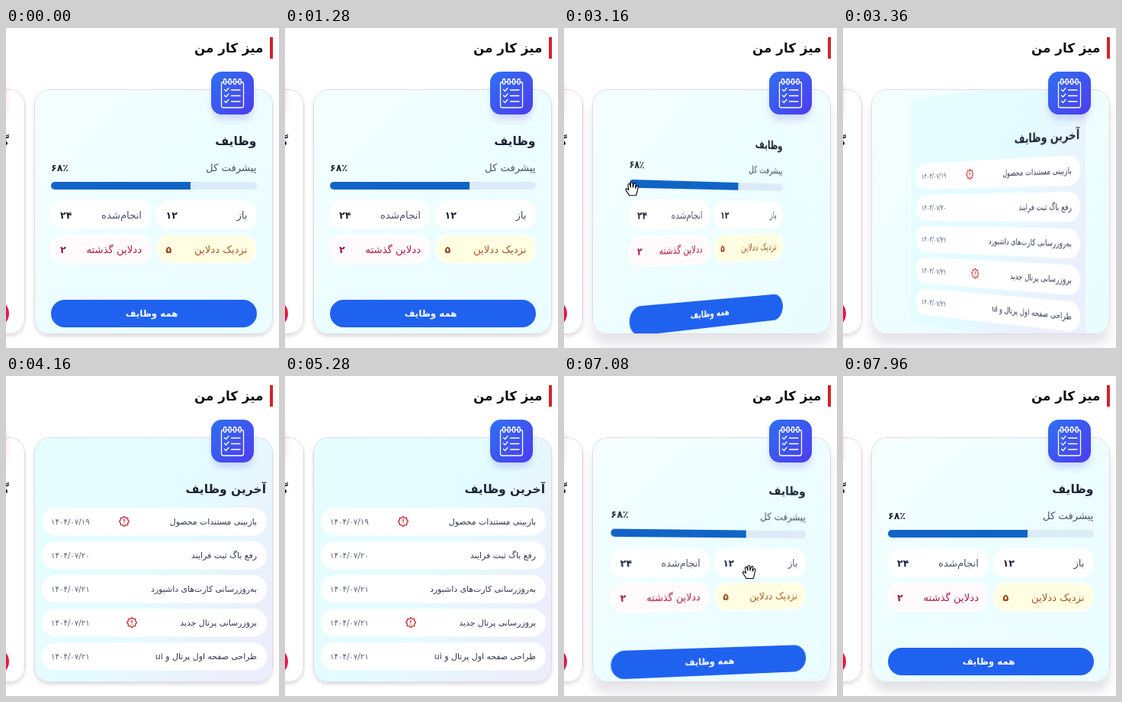
Write an HTML page that moves like this. It is 358 px wide and 418 px high and loops after 8 s.

```html
<!DOCTYPE html>
<html lang="fa">
<head>
<meta charset="utf-8">
<title>میز کار</title>
<style>
  html, body { margin: 0; width: 100%; height: 100%; overflow: hidden; background: #fff; }
  #stage { position: relative; width: 358px; height: 418px; overflow: hidden; background: #fff; }
  #stage > svg { position: absolute; left: 0; top: 0; }
  .card { position: absolute; top: 80px; width: 313px; height: 320px; border-radius: 20px; overflow: hidden; }
  .card::after { content: ""; position: absolute; inset: 0; border: 1px solid #e4d9e2; border-radius: 20px; }
  #side { left: -288px; background: #fff; box-shadow: 0 3px 4px rgba(70, 60, 100, .16); }
  #side::after { border-color: #f0ccd8; }
  #main { left: 37px; background: linear-gradient(135deg, #f5feff, #e8fdff); }
  .face { position: absolute; left: 0; top: 0; }
  text { font-family: "DejaVu Sans", sans-serif; direction: rtl; }
  .b { font-weight: bold; }
  .h { font-weight: bold; font-size: 15.5px; fill: #1d2337; }
  .label { font-size: 13.2px; fill: #4b5368; }
  .num { font-size: 12.6px; font-weight: bold; fill: #1d2337; }
  .task { font-size: 10.9px; fill: #30364a; }
  .date { font-size: 10.2px; fill: #5c6273; }
  .left { text-anchor: end; }
</style>
</head>
<body>
<div id="stage">
  <div class="card" id="side"></div>
  <div class="card" id="main">
    <svg class="face" id="front" width="313" height="320" viewBox="37 80 313 320">
      <defs>
        <linearGradient id="frontBg" x1="0" y1="0" x2="1" y2="1">
          <stop offset="0" stop-color="#f5feff"/><stop offset=".5" stop-color="#ecfeff"/><stop offset="1" stop-color="#eafdff"/>
        </linearGradient>
        <clipPath id="track"><rect x="59" y="201" width="270" height="10" rx="5"/></clipPath>
      </defs>
      <rect x="37" y="80" width="313" height="320" fill="url(#frontBg)"/>
      <text class="h" x="328.5" y="153">وظایف</text>
      <text class="label" x="328.5" y="187">پیشرفت کل</text>
      <text class="num left" x="59" y="187">۶۸٪</text>
      <g clip-path="url(#track)">
        <rect x="59" y="201" width="270" height="10" fill="#dcebf7"/>
        <rect x="59" y="201" width="183" height="10" fill="#1064c6"/>
      </g>
      <g id="tiles"></g>
      <rect x="59" y="355" width="270" height="36" rx="18" fill="#2062f0"/>
      <text class="b" x="225.5" y="377" font-size="11.8" fill="#fff">همه وظایف</text>
    </svg>
    <svg class="face" id="back" width="313" height="320" viewBox="37 80 313 320">
      <defs>
        <linearGradient id="backBg" x1="0" y1="0" x2="1" y2=".6">
          <stop offset="0" stop-color="#e6feff"/><stop offset=".6" stop-color="#e4fcff"/><stop offset="1" stop-color="#ebeffc"/>
        </linearGradient>
      </defs>
      <rect x="37" y="80" width="313" height="320" fill="url(#backBg)"/>
      <text class="h" x="341" y="153">آخرین وظایف</text>
      <g id="rows"></g>
    </svg>
  </div>
  <svg width="358" height="418" viewBox="0 0 358 418">
    <defs>
      <linearGradient id="iconBg" x1="0" y1="0" x2="1" y2="1">
        <stop offset="0" stop-color="#2f70f2"/><stop offset="1" stop-color="#4d3cee"/>
      </linearGradient>
      <filter id="soft" x="-50%" y="-50%" width="200%" height="200%"><feGaussianBlur stdDeviation="4"/></filter>
    </defs>
    <rect x="346" y="12" width="4" height="28" fill="#d2232a"/>
    <text class="b" x="337.5" y="32" font-size="16.8" fill="#0c0c10">میز کار من</text>

    <rect x="-56" y="65" width="56" height="54" rx="14" fill="#e6174f" opacity=".16" filter="url(#soft)"/>
    <text class="h" x="4" y="153">گزارش</text>
    <rect x="-266" y="355" width="270" height="36" rx="18" fill="#e6174a"/>

    <rect x="270" y="66" width="54" height="54" rx="14" fill="#5a48e0" opacity=".2" filter="url(#soft)"/>
    <rect x="269" y="57" width="56" height="56" rx="14" fill="url(#iconBg)"/>
    <g id="pad" fill="none" stroke="#fff" stroke-width="1.3" stroke-linecap="round" stroke-linejoin="round">
      <rect x="282.5" y="70.5" width="29" height="33.5" rx="2.5"/>
    </g>
    <g id="hand" fill="#fff" stroke="#000" stroke-width="1.1" stroke-linejoin="round" stroke-linecap="round">
      <path id="open" d="M-4 8.5C-5 5.5-9 2-8.5.5C-8-1-6-.5-4.5 1.5L-5.5-5C-5.6-7-3.5-7.3-3-5.5L-2-2L-2-7C-1.8-9 .6-9 .8-7L1-2L2.5-6.5C3.2-8.2 5.2-7.5 4.8-5.8L4-1L5.8-3.5C7-5 8.6-4 8-2.4C6.6 1 7 5 5 8.5Z"/>
      <path id="shut" d="M-4 6.5C-4.5 4-7 2.5-6.5 0C-6.2-1.2-5-1.2-4.6-1L-4.8-4C-4.6-5.8-2.6-5.8-2-4.8C-1.6-6.6.6-6.6 1.2-5.2C2-6.4 3.8-6 4-4.4C5.6-5 6.6-4 6.5-2.4C6.3 1 6 3.5 4.4 6.5Z"/>
    </g>
  </svg>
</div>
<script>
  const LOOP = 8000;
  const $ = id => document.getElementById(id);
  const add = (id, markup) => $(id).insertAdjacentHTML("beforeend", markup);

  const tile = (x, y, label, num, bg, ink, numInk) => `
    <rect x="${x}" y="${y}" width="132" height="38" rx="17" fill="#fff"/>
    <rect x="${x + 1.5}" y="${y + 1.5}" width="129" height="35" rx="16" fill="${bg}"/>
    <text class="label" x="${x + 119.5}" y="${y + 24}" style="fill:${ink}">${label}</text>
    <text class="num left" x="${x + 12.5}" y="${y + 24}" style="fill:${numInk}">${num}</text>`;
  add("tiles",
    tile(197, 225, "باز", "۱۲", "#fff", "#4b5368", "#1d2337") +
    tile(58.5, 225, "انجام&zwnj;شده", "۲۴", "#fff", "#4b5368", "#1d2337") +
    tile(197, 269.5, "نزدیک ددلاین", "۵", "#fffde2", "#a65a20", "#8f4310") +
    tile(58.5, 269.5, "ددلاین گذشته", "۲", "#fffafc", "#a8184a", "#9c1240"));

  // Scalloped urgent badge
  function badge(x, y) {
    let d = "";
    for (let i = 0; i < 48; i++) {
      const a = i * Math.PI / 24, r = 5.7 + .7 * Math.cos(a * 8);
      d += (i ? "L" : "M") + (x + r * Math.cos(a)).toFixed(2) + " " + (y + r * Math.sin(a)).toFixed(2);
    }
    return `<path d="${d}ZM${x} ${y - 2.8}v3.2M${x} ${y + 2.6}v.1" fill="none" stroke="#c4282e" stroke-width="1.3" stroke-linecap="round"/>`;
  }

  const tasks = [
    ["بازبینی مستندات محصول", "۱۹", 155],
    ["رفع باگ ثبت فرایند", "۲۰"],
    ["به&zwnj;روزرسانی کارت&zwnj;های داشبورد", "۲۱"],
    ["بروزرسانی پرتال جدید", "۲۱", 165],
    ["طراحی صفحه اول پرتال و ui", "۲۱"]
  ];
  tasks.forEach(([name, day, mark], i) => {
    const y = 172 + 44 * i;
    add("rows", `<rect x="47" y="${y}" width="295" height="36.5" rx="18" fill="#fff"/>
      <text class="task" x="329" y="${y + 22}">${name}</text>
      <text class="date left" x="59" y="${y + 22}">۱۴۰۴/۰۷/${day}</text>` + (mark ? badge(mark, y + 18) : ""));
  });

  for (let i = 0; i < 4; i++)
    add("pad", `<rect x="${285.6 + 6.5 * i}" y="66.5" width="3" height="7" rx="1.5" fill="#3f5cf1"/>`);
  for (const y of [80.5, 88, 95.5])
    add("pad", `<path d="M286.5 ${y}l2 2l3.5-4M295.5 ${y + .5}h11.5"/>`);

  const clamp = v => Math.min(1, Math.max(0, v));
  const ramp = (t, from, to) => clamp((t - from) / (to - from));
  const smooth = u => u * u * (3 - 2 * u);

  // CSS "ease": cubic-bezier(.25, .1, .25, 1)
  function ease(x) {
    if (x <= 0 || x >= 1) return clamp(x);
    const bez = (u, p, q) => 3 * u * (1 - u) ** 2 * p + 3 * u * u * (1 - u) * q + u ** 3;
    let lo = 0, hi = 1;
    for (let i = 0; i < 24; i++) {
      const mid = (lo + hi) / 2;
      if (bez(mid, .25, .25) < x) lo = mid; else hi = mid;
    }
    return bez(lo, .1, 1);
  }

  // [time, x, y]
  const visits = [
    [[2240, -14, 232], [2560, 97, 209], [2700, 102, 208], [3120, 102, 208], [3320, -14, 228]],
    [[6320, 250, 432], [6580, 243, 256], [7520, 243, 256], [7860, 252, 432]]
  ];

  function pointer(t) {
    for (const path of visits)
      for (let i = 1; i < path.length; i++) {
        const [t0, x0, y0] = path[i - 1], [t1, x1, y1] = path[i];
        if (t >= t0 && t < t1) {
          const u = smooth((t - t0) / (t1 - t0));
          return [x0 + (x1 - x0) * u, y0 + (y1 - y0) * u];
        }
      }
    return null;
  }

  function turn(face, angle) {
    face.style.visibility = Math.abs(angle) < 90 ? "visible" : "hidden";
    face.style.transform = angle ? `perspective(1200px) rotateY(${angle}deg)` : "none";
  }

  function draw(t) {
    const angle = 180 * (ease(ramp(t, 3040, 3740)) - ease(ramp(t, 6650, 7350)));
    turn($("front"), angle);
    turn($("back"), angle - 180);

    const hover = ease(ramp(t, 2440, 2840)) - ease(ramp(t, 3340, 3800))
      + ease(ramp(t, 6360, 6700)) - ease(ramp(t, 7900, 8300));
    $("main").style.boxShadow =
      `0 ${3 + 11 * hover}px ${4 + 10 * hover}px rgba(60,55,85,${.17 - .04 * hover})`;

    const at = pointer(t);
    $("hand").style.display = at ? "" : "none";
    if (at) {
      const held = (t >= 2980 && t < 3080) || (t >= 6600 && t < 6760);
      $("hand").setAttribute("transform", `translate(${at[0]} ${at[1]})`);
      $("open").style.display = held ? "none" : "";
      $("shut").style.display = held ? "" : "none";
    }
  }

  function tick() {
    draw(performance.now() % LOOP);
    requestAnimationFrame(tick);
  }
  tick();
</script>
</body>
</html>
```
